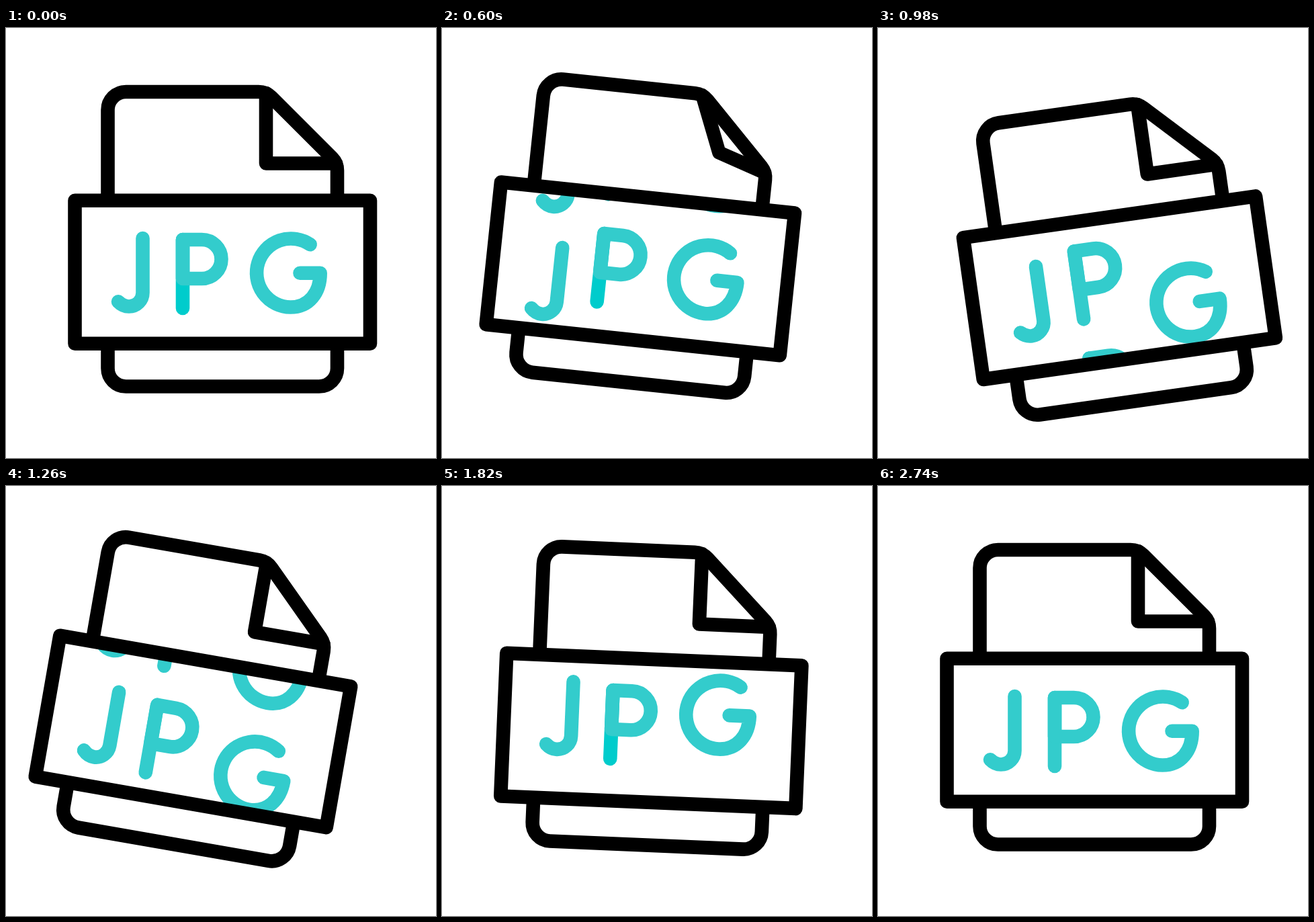
Write an HTML page with a canvas that moves like this. It is 640x640 px and loops after 3000 ms.

```html
<!DOCTYPE html>
<html lang="en">
<head>
<meta charset="utf-8">
<title>JPG file</title>
<style>
  html, body { margin: 0; height: 100%; overflow: hidden; background: #fff; }
  canvas { display: block; width: 640px; height: 640px; }
</style>
</head>
<body>
<canvas id="stage" width="640" height="640"></canvas>
<script>
const ctx = document.getElementById('stage').getContext('2d');
const LOOP = 3000;
const INK = '#000', TEAL = '#33cccc', DEEP = '#00cccc';
const BOX = { x: 102.5, y: 256.7, w: 439.5, h: 213 };
const PIVOT = { x: 386.1, y: 103 };
const SPIN = { start: 132, length: 328, count: 6, step: 161, kick: 0.44 };

const page = new Path2D(`M151.5 122 a27 27 0 0 1 27 -27 H376 A27 27 0 0 1 395.1 103
  L485.2 193 A27 27 0 0 1 493 212 V506.5 a27 27 0 0 1 -27 27 H178.5 a27 27 0 0 1 -27 -27 Z`);
const glyphJ = new Path2D('M203.5 313 V394 a20.5 20.5 0 0 1 -20.5 20.5 q-9 0 -16 -7.2');
const stemP = new Path2D('M263 315 V417');
const bowlP = new Path2D('M263 315 H291.5 a29 29 0 0 1 0 58 H263 Z');
const glyphG = new Path2D('M452.7 322.3 A51 51 0 1 0 423.5 415.5 C451 415.5 467.7 394 467.7 364.7 H437.5');

// The reels spin together; each runs slightly ahead or behind from spin to spin.
const reels = [
  { mean: 0.001, drift: 0, swing: 0.026, phase: Math.PI,
    draw: () => stroke(glyphJ, TEAL) },
  { mean: 0.024, drift: -0.021, swing: 0.032, phase: 0.73,
    draw: deep => { stroke(stemP, deep ? DEEP : TEAL); stroke(bowlP, TEAL); } },
  { mean: 0.044, drift: 0, swing: 0.094, phase: 1.81,
    draw: () => stroke(glyphG, TEAL) }
];

function ramp(t, from, to) {
  const u = Math.min(1, Math.max(0, (t - from) / (to - from)));
  return u * u * (3 - 2 * u);
}

function stroke(path, color, width = 20.6) {
  ctx.strokeStyle = color;
  ctx.lineWidth = width;
  ctx.stroke(path);
}

// One letter leaves downwards while the next arrives, pulling back first and overshooting.
function drawReel(reel, t) {
  const turns = Math.min(SPIN.count, Math.max(0, (t - SPIN.start) / SPIN.length));
  const n = Math.floor(turns), u = turns - n;
  const lead = reel.mean + reel.drift * n + reel.swing * Math.cos(2 * Math.PI * n / 3 + reel.phase);
  const r = ramp(u + lead * 4 * u * (1 - u), 0, 1);
  const offset = SPIN.step * (r - SPIN.kick * Math.sin(2 * Math.PI * r));
  const deep = n === 0 || n % 3 > 0;

  ctx.save();
  ctx.translate(0, offset);
  reel.draw(deep);
  ctx.translate(0, -SPIN.step);
  reel.draw(false);
  ctx.restore();
}

// Highlight that runs once around the box, clockwise from the lower right.
function drawRunner(t) {
  const total = 2 * (BOX.w + BOX.h);
  const head = total * ramp(t, 2000, 2500), tail = total * ramp(t, 2120, 2740);
  if (head - tail < 1) return;
  const right = BOX.x + BOX.w, bottom = BOX.y + BOX.h;
  const edge = new Path2D(`M${right} ${bottom} H${BOX.x} V${BOX.y} H${right} V${bottom}`);
  ctx.setLineDash([head - tail, 2 * total]);
  ctx.lineDashOffset = -tail;
  stroke(edge, TEAL, 23);
  ctx.setLineDash([]);
}

function draw(t) {
  const lift = ramp(t, 95, 416), fall = ramp(t, 416, 910);
  const back = ramp(t, 910, 1280), settle = ramp(t, 1280, 2075);
  const angle = 13.4 * lift - 23.4 * fall + 20.05 * back - 10.05 * settle;
  const drop = 17.1 * (ramp(t, 480, 910) - settle);
  const curl = lift - fall;

  ctx.fillStyle = '#fff';
  ctx.fillRect(0, 0, 640, 640);
  ctx.save();
  ctx.lineCap = ctx.lineJoin = 'round';
  ctx.translate(PIVOT.x, PIVOT.y + drop);
  ctx.rotate(angle * Math.PI / 180);
  ctx.translate(-PIVOT.x, -PIVOT.y);

  stroke(page, INK);
  stroke(new Path2D(`M387 97 L${387 + 49 * curl} ${201.5 - 33 * curl} L491 201.5`), INK);

  const box = new Path2D();
  box.rect(BOX.x, BOX.y, BOX.w, BOX.h);
  ctx.fill(box);
  ctx.save();
  ctx.clip(box);
  reels.forEach(reel => drawReel(reel, t));
  ctx.restore();
  stroke(box, INK);
  drawRunner(t);
  ctx.restore();
}

const start = performance.now();
function tick() {
  draw((performance.now() - start) % LOOP);
  requestAnimationFrame(tick);
}
tick();
</script>
</body>
</html>
```
